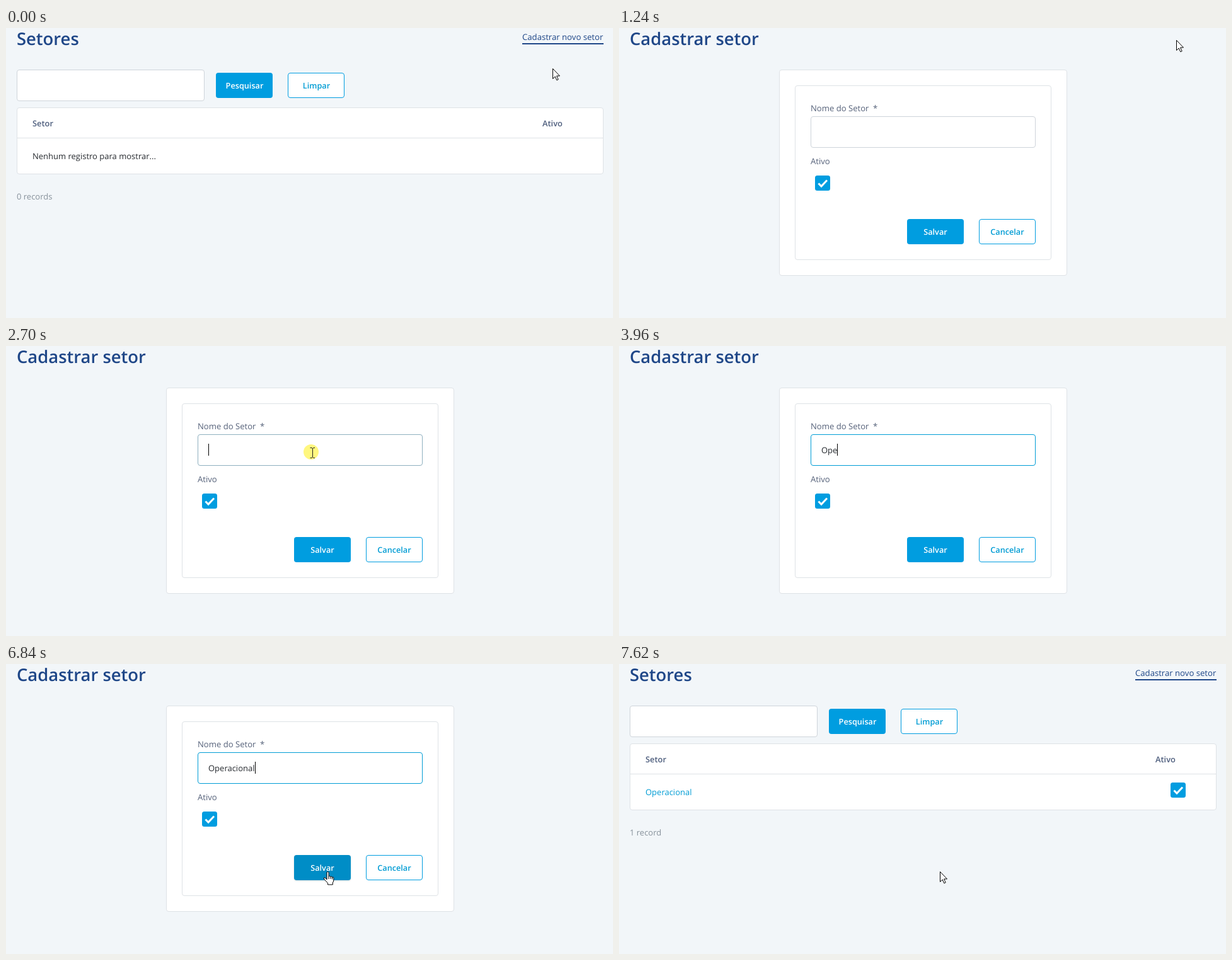
These frames come from a looping animation (963 px wide and 460 px high, 8 s). An HTML page:

```html
<!DOCTYPE html>
<html lang="pt-BR">
<head>
<meta charset="utf-8">
<title>Setores</title>
<style>
  html, body { margin: 0; width: 100%; height: 100%; overflow: hidden; background: #f2f6f9; }
  svg { display: block; }
  text { font: 13px "Open Sans", "Noto Sans", sans-serif; fill: #272b30; text-rendering: geometricPrecision; white-space: pre; }
  .title { font-size: 27.4px; font-weight: 600; fill: #1f4788; }
  .head { font-size: 12.9px; font-weight: 600; fill: #4f5f7e; }
  .label { font-size: 13.1px; fill: #56627a; }
  .muted { fill: #87919b; }
  .box { fill: #fff; stroke: #dee2e6; }
  .input { fill: #fff; stroke: #ced4da; }
  .solid { fill: #009de0; }
  .outline { fill: #fff; stroke: #009de0; }
  .button { font-size: 12.7px; font-weight: 600; text-anchor: middle; fill: #fff; }
  .blue { fill: #009cd4; }
  #link text { font-size: 13.15px; }
  .pointer { fill: #fff; stroke: #000; stroke-linejoin: round; }
</style>
</head>
<body>
<svg width="963" height="460" viewBox="0 0 963 460">
  <defs>
    <g id="check">
      <rect class="solid" width="24" height="24" rx="3.5"/>
      <path d="M5.5 12.5L10 17L19 7.5" fill="none" stroke="#fff" stroke-width="3"/>
    </g>
  </defs>

  <g id="list">
    <text class="title" x="17" y="27">Setores</text>
    <g id="link">
      <text x="819" y="19" fill="inherit" style="fill:inherit">Cadastrar novo setor</text>
      <rect x="819" y="24" width="129" height="2"/>
    </g>
    <rect class="input" x="17.5" y="66.5" width="297" height="49" rx="3.5"/>
    <rect class="solid" x="333" y="71" width="90" height="40" rx="4"/>
    <text class="button" x="378.5" y="96">Pesquisar</text>
    <rect class="outline" x="447.5" y="71.5" width="89" height="39" rx="3.5"/>
    <text class="button blue" x="492.5" y="96">Limpar</text>
    <rect class="box" x="17.5" y="126.5" width="930" height="105" rx="3.5"/>
    <path d="M18 174.5H947" stroke="#dee2e6"/>
    <text class="head" x="42" y="156">Setor</text>
    <text class="head" x="851" y="156">Ativo</text>
    <g id="empty">
      <text x="42" y="208">Nenhum registro para mostrar...</text>
      <text class="muted" x="17" y="272">0 records</text>
    </g>
    <g id="filled">
      <text class="blue" x="42" y="208">Operacional</text>
      <use href="#check" x="875" y="188"/>
      <text class="muted" x="17" y="272">1 record</text>
    </g>
  </g>

  <g id="form">
    <text class="title" x="17" y="27">Cadastrar setor</text>
    <rect class="box" x="254.5" y="66.5" width="456" height="326" rx="3.5"/>
    <rect class="box" x="279.5" y="91.5" width="406" height="276" rx="3.5"/>
    <text class="label" x="304" y="132">Nome do Setor</text>
    <text class="label" x="403" y="132">*</text>
    <rect class="input" id="field" x="304.5" y="140.5" width="356" height="49" rx="3.5"/>
    <text id="typed" x="321" y="170"></text>
    <rect id="caret" y="155" width="1" height="19"/>
    <text class="label" x="304" y="216">Ativo</text>
    <use href="#check" x="311" y="234"/>
    <rect id="save" x="457" y="303" width="90" height="40" rx="4"/>
    <text class="button" x="502" y="328">Salvar</text>
    <rect class="outline" x="571.5" y="303.5" width="89" height="39" rx="3.5"/>
    <text class="button blue" x="616" y="328">Cancelar</text>
  </g>

  <circle id="click" r="12" fill="#fff77f"/>
  <g id="pointer">
    <path id="arrow" class="pointer" d="M.5 .5V16.5L4.2 13L6.8 18.8L9.2 17.7L6.6 12H11.5Z"/>
    <path id="hand" class="pointer" d="M0 13V2a1.5 1.5 0 0 1 3 0V8q1.5-1.5 3 .5q1.5-1 2.6 .6q2.2-.6 2.2 1.4V14q0 2-1.5 4v3H1.5V18.5L-4.5 12q-1-2.5 1.5-2.2ZM3 8v4M6 8.5v3.5M8.6 9v3.5"/>
    <path id="beam" fill="none" stroke="#222" d="M-3.5 -7.5H-1L.5 -6.5L2 -7.5H4M.5 -6.5V7M-3.5 8.5H-1L.5 7.5L2 8.5H4"/>
  </g>
</svg>
<script>
const LOOP = 8000, STEP = 76;
const WORD = "Operacional";
const keyTimes = [3170, 3560, 3960, 4200, 4430, 4670, 4900, 5120, 5270, 5590, 5730];

// start, end, from x, from y, to x, to y
const moves = [
  [0, 400, 867, 64, 884, 19],
  [1564, 2400, 884, 19, 486, 169],
  [2930, 3100, 486, 169, 502, 169],
  [5810, 6500, 613, 378, 509, 329]
];
const clicks = [[480, 630], [2700, 2930], [6910, 7150]];

const el = id => document.getElementById(id);
const show = (id, on) => el(id).style.display = on ? "" : "none";
const within = (t, a, b) => t >= a && t < b;

function pointerAt(t) {
  const [start, end, x0, y0, x1, y1] = moves.filter(m => t >= m[0]).pop();
  const stepped = Math.floor((t - start) / STEP) * STEP;
  const p = t >= end ? 1 : stepped / (end - start);
  const e = p * p * (3 - 2 * p);
  return [Math.round(x0 + (x1 - x0) * e), Math.round(y0 + (y1 - y0) * e)];
}

function fieldColor(t, hovered) {
  if (within(t, 2700, 2780)) return "#8fb0bf";
  if (within(t, 2780, 6910)) return "#009dd6";
  if (within(t, 6910, 6990)) return "#7fb8d4";
  return hovered ? "#a9b4bf" : "#ced4da";
}

function draw(t) {
  const saved = t >= 7530;
  const onList = t < 1240 || saved;
  const [x, y] = pointerAt(t);
  const overLink = t < 1240 && y < 26;
  const overField = within(t, 1640, 3170) && x < 661 && y > 140;
  const overSave = within(t, 5910, 7530) && x < 547 && y < 343;

  show("list", onList);
  show("form", !onList);
  show("empty", !saved);
  show("filled", saved);
  el("link").style.fill = overLink ? "#17336a" : "#1f4788";

  el("field").style.stroke = fieldColor(t, overField);
  const typed = el("typed");
  typed.textContent = WORD.slice(0, keyTimes.filter(k => t >= k).length);
  show("caret", within(t, 2700, 6910));
  if (!onList) el("caret").setAttribute("x", 321 + Math.round(typed.getComputedTextLength()));
  el("save").style.fill = overSave ? "#008dc6" : "#009de0";
  el("save").style.filter = overSave ? "drop-shadow(0 1px 1px #0002)" : "";

  show("click", clicks.some(([a, b]) => within(t, a, b)));
  el("click").setAttribute("cx", x - (overField ? 2 : 0));
  el("click").setAttribute("cy", y + (overField ? -1 : 2));
  show("pointer", !within(t, 3170, 5810));
  el("pointer").setAttribute("transform", `translate(${x} ${y})`);
  show("hand", overLink || overSave);
  show("beam", overField);
  show("arrow", !overLink && !overSave && !overField);
}

const origin = performance.now();
function tick() {
  draw((performance.now() - origin) % LOOP);
  requestAnimationFrame(tick);
}
tick();
</script>
</body>
</html>
```
